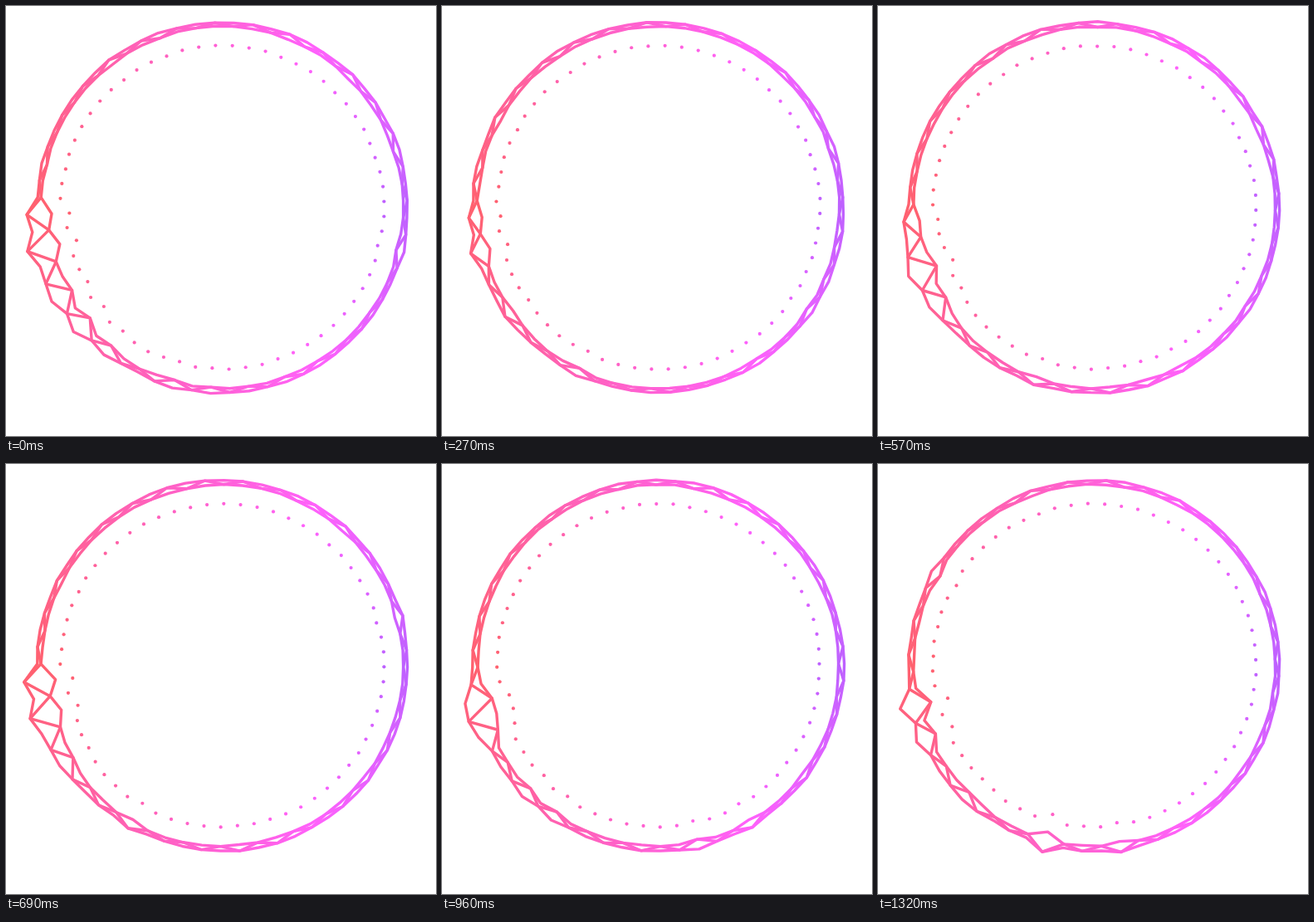
An HTML page with a canvas that plays this animation: 518 by 518 pixels, repeating every 1350 ms.

```html
<!DOCTYPE html>
<html>
<head>
<meta charset="utf-8">
<style>
  html, body { margin: 0; width: 100%; height: 100%; overflow: hidden; background: #fff; }
  canvas { display: block; }
</style>
</head>
<body>
<canvas id="stage" width="518" height="518"></canvas>
<script>
const ctx = document.getElementById('stage').getContext('2d');
const COUNT = 64, STEP_MS = 30, STEPS = 45;
const CX = 260.5, CY = 242.7, RING = 220.6, DOTS = 195.3;
const SPACING = 2 * Math.PI / COUNT;

// Levels of the low bands (from band 1) and single peaks elsewhere, at some steps.
const poses = [
  { at: 0, low: [13, 8, 18, 8, 9, 12, 4, 11, 2], peaks: { 10: 5, 14: 3, 30: 3 } },
  { at: 9, low: [6, 2, 10, 2.5, 1, 2, 4, 2, 1], peaks: { 12: 3 } },
  { at: 15, low: [6, 10.5, 0, 14, 4, 9, 5, 4, 1], peaks: { 10: 4, 13: 5, 17: 3, 37: 3 } },
  { at: 23, low: [17, 8, 17.5, 10, 7.5, 7.5, 4, 2, 2], peaks: { 11: 4, 35: 3 } },
  { at: 32, low: [4, 14.5, 15.5, 10.5, 2.5, 3, 2, 5, 0], peaks: { 10: 4, 18: 4, 21: 3 } },
  { at: 39, low: [15.5, 15.5, 8.5, 1, 3.5, 7, 3.5, 12.5, 3], peaks: { 12: 4.5, 30: 4, 44: 3, 48: 3 } },
  { at: 44, low: [2, 17, 3.5, 10.5, 2, 3, 3, 4, 3], peaks: { 13: 10.5, 17: 4.5, 58: 4 } }
];

const gradient = ctx.createConicGradient(0, CX, CY);
for (let i = 0; i <= 12; i++) {
  const hue = 275 + 80 * (1 - Math.abs(1 - i / 6));
  gradient.addColorStop(i / 12, `hsl(${hue}, 100%, 69%)`);
}

function random(a, b) {
  const v = Math.sin(a * 12.9898 + b * 78.233) * 43758.5453;
  return v - Math.floor(v);
}

// Value noise over time, with a new value every three steps.
function noise(band, step) {
  const node = Math.floor(step / 3), f = step / 3 - node;
  return random(band, node) * (1 - f) + random(band, node + 1) * f;
}

function poseLevel(pose, band) {
  return band > 0 && band <= pose.low.length ? pose.low[band - 1] : pose.peaks[band] || 0;
}

function levelAt(band, step) {
  let i = 0;
  while (i < poses.length - 2 && step >= poses[i + 1].at) i++;
  const a = poses[i], b = poses[i + 1];
  const f = (step - a.at) / (b.at - a.at);
  const mixed = poseLevel(a, band) * (1 - f) + poseLevel(b, band) * f;
  const sway = 1 + Math.sin(Math.PI * f) * (noise(band + 100, step) - 0.5);
  return Math.max(mixed * sway, 2 * noise(band, step) ** 2);
}

// Angles run from the left side counter-clockwise and bunch up at the sides.
function point(band, radius, step) {
  const even = (band + step / STEPS) * SPACING - 0.059;
  const angle = even - 0.03 * Math.sin(2 * even);
  return [CX - radius * Math.cos(angle), CY + radius * Math.sin(angle)];
}

function loopLine(levels, step, sideOf) {
  ctx.beginPath();
  levels.forEach((level, band) =>
    ctx.lineTo(...point(band, RING + sideOf(band) * (2 + level), step)));
  ctx.closePath();
  ctx.stroke();
}

function draw(step) {
  const levels = Array.from({ length: COUNT }, (_, band) => levelAt(band, step));
  ctx.fillStyle = '#fff';
  ctx.fillRect(0, 0, 518, 518);
  ctx.strokeStyle = ctx.fillStyle = gradient;
  ctx.lineWidth = 3.4;
  ctx.lineJoin = 'round';

  loopLine(levels, step, () => 1);
  loopLine(levels, step, () => -1);
  loopLine(levels, step, band => band % 2 ? 1 : -1);

  levels.forEach((level, band) => {
    ctx.beginPath();
    ctx.arc(...point(band, DOTS - 0.85 * level, step), 2.1, 0, 2 * Math.PI);
    ctx.fill();
  });
}

function frame() {
  draw(Math.floor(performance.now() / STEP_MS) % STEPS);
  requestAnimationFrame(frame);
}
frame();
</script>
</body>
</html>
```
